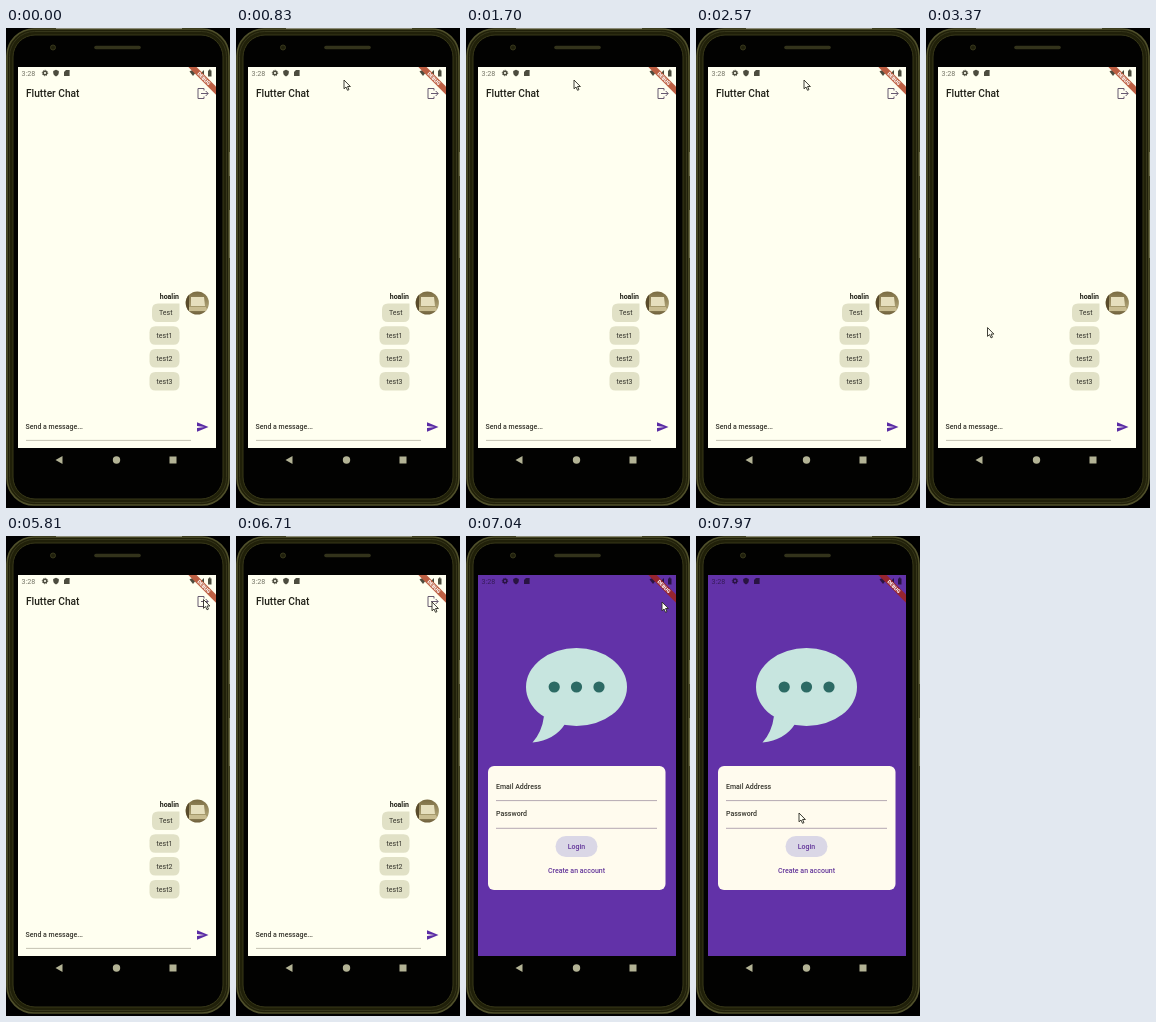
An HTML page that plays this animation: 224x480 px, repeating every 8 s.

```html
<!DOCTYPE html>
<html lang="en">
<head>
<meta charset="utf-8">
<title>Chat app</title>
<style>
  html, body { margin: 0; width: 100%; height: 100%; overflow: hidden; background: #000; }
  svg { display: block; width: 224px; height: 480px; }
  text { font: 7px Roboto, sans-serif; fill: #35342c; }
  .mid { text-anchor: middle; }
  .medium { font-weight: 500; }
  .link { fill: #63369a; }
</style>
</head>
<body>
<svg viewBox="0 0 224 480">
  <defs>
    <clipPath id="screenClip"><path d="M12 39h198v381H12z"/></clipPath>
    <clipPath id="avatarClip"><circle cx="191.3" cy="275" r="11.6"/></clipPath>
    <linearGradient id="photo" x2="0" y2="1">
      <stop stop-color="#786940"/><stop offset=".6" stop-color="#a99d70"/><stop offset="1" stop-color="#62522f"/>
    </linearGradient>
  </defs>

  <!-- Phone body -->
  <g fill="none" stroke="#50502b">
    <rect x="1" y="1" width="222" height="476" rx="27" fill="#202009" stroke-width="1.6"/>
    <rect x="3.5" y="3.5" width="217" height="471" rx="25" stroke="#36361a"/>
    <rect x="7" y="7" width="210" height="464" rx="22" fill="#020201" stroke="#383819"/>
    <path d="M50 .5H176" stroke="#8b8b79"/>
    <path d="M223.5 124v24m0 34v48" stroke="#707050"/>
    <path d="M90 19.5h43" stroke="#33331b" stroke-width="3.6" stroke-linecap="round"/>
    <circle cx="47" cy="19.5" r="2.5" fill="#20200c" stroke="#38381c"/>
  </g>
  <g fill="#b3b395">
    <path d="M49.5 432l7-4v8z"/><circle cx="110.5" cy="432" r="3.7"/>
    <rect x="163.5" y="428.5" width="7" height="7"/>
  </g>

  <g clip-path="url(#screenClip)">
    <g id="chat">
      <path d="M12 39h198v381H12z" fill="#fffff0"/>
      <text x="20" y="69" class="medium" style="font-size:10.2px;fill:#222219">Flutter Chat</text>
      <path d="M198 62.5v-2h-6v10h6v-2M195 65.5h7m-2.3-2.5l2.5 2.5-2.5 2.500" fill="none" stroke="#675a70"/>
      <text x="173" y="271.3" text-anchor="end" style="font-weight:700;fill:#222219">hoalin</text>
      <g clip-path="url(#avatarClip)">
        <path d="M179 263h25v25h-25z" fill="url(#photo)"/>
        <path d="M185 269h13l1 9h-14z" fill="#e6dfbd"/>
        <path d="M183 279h17l2 4h-20z" fill="#c9bd91"/>
        <path d="M179 263h4v20h-4z" fill="#594b2b"/>
      </g>
      <g id="messages"></g>
      <text x="19.5" y="400.7" class="medium">Send a message...</text>
      <path d="M20 412.4h165" stroke="#b6b4a4" stroke-width=".8"/>
      <path d="M191 394.2l11.5 4.8-11.5 4.8v-3.8l7.5-1-7.5-1z" fill="#5a2ca5"/>
    </g>

    <g id="login" visibility="hidden">
      <path d="M12 39h198v381H12z" fill="#6232a8"/>
      <path d="M78 180Q76 196 66.5 206.5Q89 204 99 188z" fill="#c7e5df"/>
      <ellipse cx="110.5" cy="151" rx="50.5" ry="39" fill="#c7e5df"/>
      <g fill="#2c6a64"><circle cx="88.2" cy="151" r="5.6"/><circle cx="110.5" cy="151" r="5.6"/><circle cx="133" cy="151" r="5.6"/></g>
      <rect x="22" y="230" width="177.5" height="124" rx="6" fill="#fffbee"/>
      <text x="30" y="253" class="medium">Email Address</text>
      <text x="30" y="280.2" class="medium">Password</text>
      <path d="M30 264.6h161M30 292.3h161" stroke="#a194a4" stroke-width=".8"/>
      <rect x="89.5" y="300" width="42" height="21" rx="10.5" fill="#dad7e6"/>
      <text x="110.5" y="312.8" class="mid medium link">Login</text>
      <text x="110.5" y="336.6" class="mid medium link">Create an account</text>
    </g>

    <!-- Status bar -->
    <g id="status" fill="currentColor">
      <text x="15.5" y="47.7" style="font-size:7.2px;fill:inherit;opacity:.75">3:28</text>
      <g fill="none" stroke="currentColor">
        <circle cx="39" cy="45" r="1.8" stroke-width="1.4"/>
        <circle cx="39" cy="45" r="2.7" stroke-dasharray="1.06"/>
      </g>
      <path d="M50 41.700l2.800 1.200v2.100q0 2.300-2.800 3.600-2.800-1.300-2.800-3.600v-2.100z"/>
      <path d="M60 42h3.600v6H58V44z"/>
      <path d="M183.500 43.500q3.500-2.500 7 0L187 48z"/><path d="M198 42v6h-6z"/>
      <path d="M202 42.500h1v-1h1.500v1h1v6H202z"/>
    </g>

    <g transform="translate(209.500 39) rotate(45)">
      <path id="ribbon" d="M-25 13.400h50v5.800h-50z"/>
      <text y="18.100" class="mid" style="font-size:5.100px;font-weight:900;fill:#fff">DEBUG</text>
    </g>
  </g>

  <path id="cursor" d="M0 0v8.800l2-1.800 1.500 3.300 1.500-.7-1.500-3.100h2.900z" fill="#fffff5" stroke="#2b2b22" stroke-width=".9" stroke-linejoin="round"/>
</svg>

<script>
const LOOP = 8000, LOGOUT_AT = 6720;
const $ = id => document.getElementById(id);

// Only the first bubble of a group has a square corner beside the avatar.
$('messages').innerHTML = ['Test', 'test1', 'test2', 'test3'].map((label, i) => {
  const left = i ? 143.5 : 146, top = 275.5 + i * 22.8, right = 173.5;
  const corner = i ? 'q6 0 6 6' : 'h6v6';
  return `<path fill="#e1e1c6" d="M${left + 6} ${top}H${right - 6}${corner}v6.5q0 6-6 6H${left + 6}q-6 0-6-6v-6.5q0-6 6-6z"/>
    <text class="mid" x="${(left + right) / 2}" y="${top + 11.7}">${label}</text>`;
}).join('');

// Cursor moves: start, end, from, to
const moves = [
  [330, 760, [122, -12], [108, 52]],
  [2680, 3600, [108, 52], [53, 345]],
  [4350, 5350, [53, 345], [197.5, 63.5]],
  [5900, 6250, [197.5, 63.5], [196, 66]],
  [7160, 7820, [196, 66], [103, 277]]
];
const ease = u => u * u * (3 - 2 * u);

function cursorAt(time) {
  const [start, end, from, to] = moves.findLast(move => time >= move[0]) || moves[0];
  const u = ease(Math.min(1, Math.max(0, (time - start) / (end - start))));
  return from.map((value, axis) => value + (to[axis] - value) * u);
}

function draw(now) {
  const time = now % LOOP, loggedOut = time >= LOGOUT_AT;
  $('chat').setAttribute('visibility', loggedOut ? 'hidden' : 'visible');
  $('login').setAttribute('visibility', loggedOut ? 'visible' : 'hidden');
  $('status').setAttribute('color', loggedOut ? '#291442' : '#4c4c3e');
  $('ribbon').setAttribute('fill', loggedOut ? '#97252f' : '#bd5f43');
  $('cursor').setAttribute('transform', `translate(${cursorAt(time)})`);
  requestAnimationFrame(draw);
}
requestAnimationFrame(draw);
</script>
</body>
</html>
```
